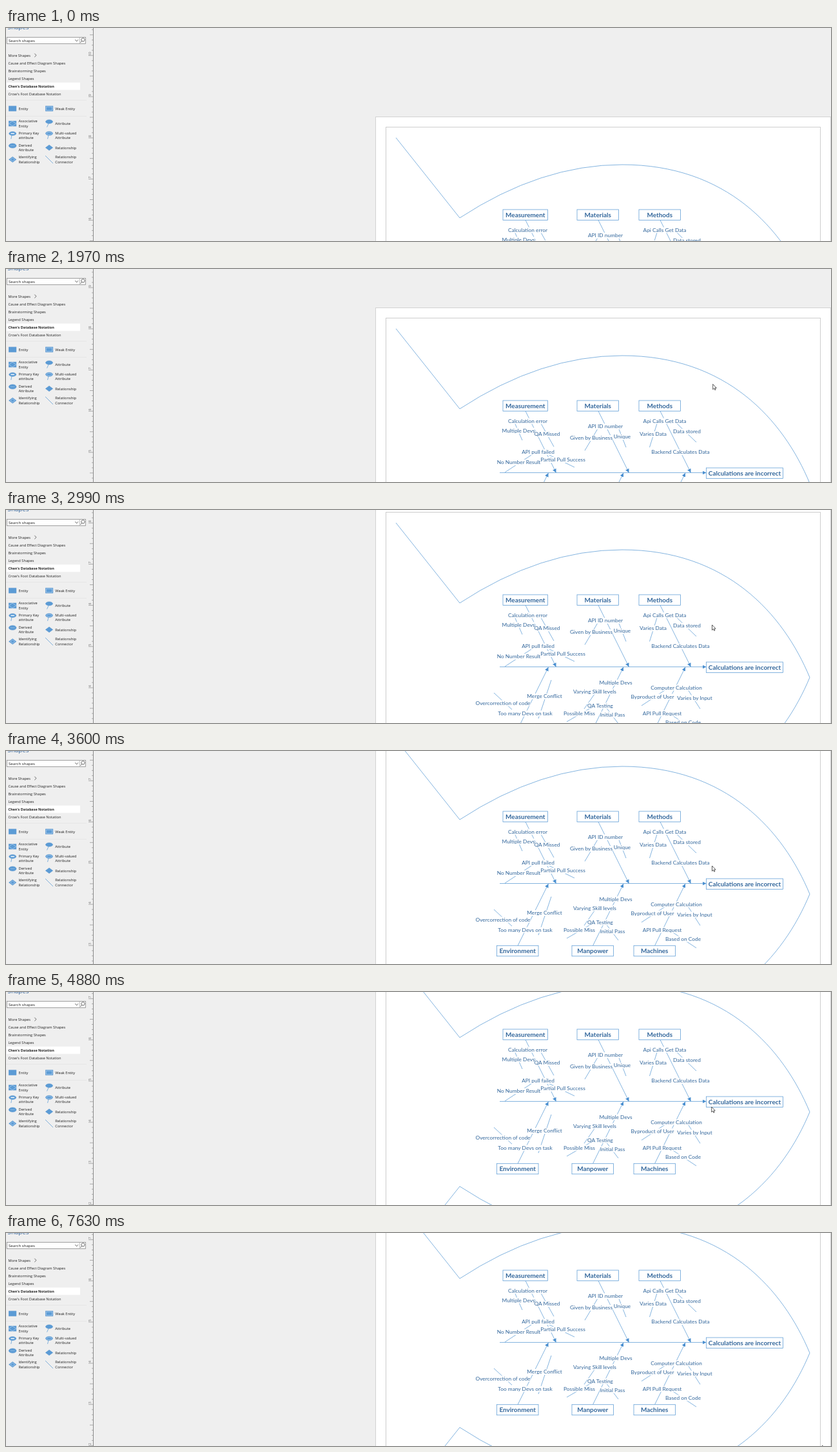
Write an HTML page that moves like this. It is 1280x332 px and loops after 7760 ms.

```html
<!DOCTYPE html>
<html>
<head>
<meta charset="utf-8">
<style>
  html, body { margin: 0; width: 100%; height: 100%; overflow: hidden; background: #efefef; }
  svg { display: block; width: 100vw; height: 100vh; }
  text { font: 5.7px "Open Sans", "Noto Sans", sans-serif; fill: #222; }
  .line { fill: none; stroke: #5b9bd5; stroke-width: .75; }
  .shape { fill: #5b9bd5; stroke: #5592cc; stroke-width: .5; }
  .inner { fill: none; stroke: #b4d2ee; stroke-width: .7; }
  .thin { fill: none; stroke: #444; stroke-width: .8; }
  #labels text { font: 8.35px Lato, Carlito, sans-serif; fill: #33679c; text-anchor: middle; }
  #heads text { font: bold 9.95px Lato, Carlito, sans-serif; fill: #33679c; text-anchor: middle; }
  #ruler text { font-size: 5px; fill: #666; text-anchor: middle; }
</style>
</head>
<body>
<svg viewBox="0 0 1280 332" preserveAspectRatio="none">
  <defs>
    <marker id="arrow" viewBox="0 0 6 6" refX="6" refY="3" markerWidth="6" markerHeight="6"
      markerUnits="userSpaceOnUse" orient="auto"><path d="M0 0L6 3L0 6Z" fill="#4a8fd0"/></marker>
  </defs>
  <rect width="1280" height="332" fill="#efefef"/>

  <g id="drawing">
    <rect x="573.5" y="-86.5" width="706" height="546" fill="#fff" stroke="#d2d2d2"/>
    <rect x="589.5" y="-70.5" width="674" height="515" fill="none" stroke="#cdcdcd"/>
    <path class="line" d="M605 -54L704 71Q830 -12 956 -12C1118 -12 1206 88 1247 187C1206 286 1118 386 956 386Q830 386 704 303L605 428"/>
    <g id="bones" class="line"></g>
    <g id="gaps" fill="#fff"></g>
    <g id="labels"></g>
    <g id="heads"></g>
  </g>
  <g id="ruler"></g>
  <path d="M135.5 0V332" stroke="#8c8c8c"/>

  <g id="panel">
    <text x="2.5" y="2.3" style="font-size:9.8px;fill:#2f639c">Shapes</text>
    <rect x="1.5" y="14.5" width="122" height="10" fill="#fff" stroke="#8a8a8a" stroke-width=".8"/>
    <path class="thin" d="M107.3 18.2L109.7 20.8L112.1 18.2M44.3 39.8L47 42.5L44.3 45.2M117.7 20.2L115.5 23"/>
    <path d="M114.5 14.5V24.5" stroke="#aaa" stroke-width=".8"/>
    <circle class="thin" cx="119.5" cy="18.3" r="2.6"/>
    <rect x="1" y="85" width="114" height="11.5" fill="#fff"/>
    <path d="M0 112.5H125M0 137.5H125" stroke="#e6e6e6"/>

    <rect class="shape" x="4.3" y="121.8" width="11.6" height="7.6"/>
    <rect class="shape" x="61.3" y="121.8" width="11.6" height="7.6"/>
    <rect class="inner" x="62.5" y="123" width="9.2" height="5.2"/>
    <rect class="shape" x="4.3" y="145" width="11.6" height="8"/>
    <path class="inner" d="M4.5 149L10 145.2L15.7 149L10 152.8Z"/>
    <path class="line" d="M66 149L63.5 154.5M9 167L7.8 173M66 167L64.5 173M61 199L73 211"/>
    <ellipse class="shape" cx="67" cy="146" rx="5.5" ry="3"/>
    <ellipse class="shape" cx="10.2" cy="164.5" rx="5.5" ry="3"/>
    <path d="M7.5 164.5H13" stroke="#fff" stroke-width="1.4"/>
    <ellipse class="shape" cx="67" cy="164.3" rx="5.5" ry="3"/>
    <ellipse class="inner" cx="67" cy="164.3" rx="4.2" ry="1.9"/>
    <ellipse class="shape" cx="10.2" cy="183.5" rx="5.8" ry="3.6"/>
    <path class="inner" d="M7.2 183.5H13.2" stroke-dasharray="1.5 .7"/>
    <path class="shape" d="M61.3 186.5L67 182.2L72.7 186.5L67 190.8Z"/>
    <path class="shape" d="M4.5 205L10.2 200.7L15.9 205L10.2 209.3Z"/>
    <path class="inner" d="M6.7 205L10.2 202.4L13.7 205L10.2 207.6Z"/>
  </g>

  <path id="cursor" d="M0 0V8.2L1.9 6.5L3.2 9.2L4.4 8.6L3.2 6H5.6Z" fill="#fff" stroke="#333" stroke-width=".8"/>
</svg>
<script>
const LOOP = 7760, STEP = 70, NOTCH = 32.15, DEPTH = 225;
const $ = id => document.getElementById(id);

function add(parent, tag, attrs, content = '') {
  const el = document.createElementNS('http://www.w3.org/2000/svg', tag);
  for (const key in attrs) el.setAttribute(key, attrs[key]);
  el.textContent = content;
  parent.appendChild(el);
  return el;
}

// Shape panel
const say = (x, mid, content, style = '') => add($('panel'), 'text', { x, y: mid + 2, style }, content);
say(4, 19.6, 'Search shapes', 'font-size:6.1px');
['More Shapes', 'Cause and Effect Diagram Shapes', 'Brainstorming Shapes', 'Legend Shapes',
  "Chen's Database Notation", "Crow's Foot Database Notation"].forEach((name, i) =>
  say(3.4, 42.5 + 12 * i, name, i == 4 ? 'font-weight:bold;font-size:5.5px' : ''));
[['Entity', 'Weak Entity', 126], ['Associative|Entity', 'Attribute', 149],
  ['Primary Key|attribute', 'Multi-valued|Attribute', 167.5], ['Derived|Attribute', 'Relationship', 186.5],
  ['Identifying|Relationship', 'Relationship|Connector', 205]].forEach(([left, right, mid]) =>
  [[19.5, left], [76.3, right]].forEach(([x, name]) => {
    const rows = name.split('|');
    rows.forEach((row, i) => say(x, mid + (i - (rows.length - 1) / 2) * 7.5, row));
  }));

// Ruler: one inch is 64.2 px
for (let n = 11; n >= 0; n--) {
  const y = 171.2 - DEPTH + (8 - n) * 64.2;
  add($('ruler'), 'text', { transform: `translate(132.3 ${y - 2.5}) rotate(-90)` }, n);
  for (let i = 0; i < 8; i++) {
    const x = i == 0 ? 128 : i == 4 ? 130 : 133;
    add($('ruler'), 'path', { d: `M${x} ${y + i * 8.025}H135`, stroke: '#999', 'stroke-width': .8 });
  }
}

// Fishbone
const arrow = d => add($('bones'), 'path', { d, 'marker-end': 'url(#arrow)' });
arrow('M766 170.5H1086.5');
[806, 919, 1015].forEach(x => arrow(`M${x} 74.5L${x + 47.5} 170.5`));
[794, 910.5, 1006.5].forEach(x => arrow(`M${x} 267.5L${x + 47.5} 171`));
add($('bones'), 'path', { d: `M788 90L801 120M829 92L850 130M815 143L774 170M843 143L882 162
  M918 102L898 136M950 100L962 131M1010 94L998.5 131M1040 93L1071 123
  M846 191L826 251M757 211L785 237M913 213L897 236M908 234L870 256M932 235L950 259
  M1022 207L986 231M1058 206L1077 236M1035 247L1071 271` });

`Calculation error,809.5,90;Multiple Devs,795,105;QA Missed,839.5,110.5;API pull failed,825.5,138.5
No Number Result,795.5,154.5;Partial Pull Success,864,150.5;API ID number,930,98.5
Given by Business,908,116.5;Unique,956,114.5;Api Calls Get Data,1022,90;Varies Data,1004,110.5
Data stored,1056.5,106.5;Backend Calculates Data,1046.5,138.5;Merge Conflict,835.5,216.5
Overcorrection of code,771,227;Too many Devs on task,805.5,243;Multiple Devs,946,195
Varying Skill levels,913.5,209;QA Testing,922,231;Possible Miss,889.5,243;Initial Pass,941,245
Computer Calculation,1040,203;Byproduct of User,1003,217;Varies by Input,1068.5,219
API Pull Request,1018,243;Based on Code,1050.5,257`.split(/[;\n]/).forEach(item => {
  const [name, x, mid] = item.split(',');
  const width = add($('labels'), 'text', { x, y: +mid + 2.9 }, name).getComputedTextLength();
  add($('gaps'), 'rect', { x: x - width / 2, y: mid - 4.5, width, height: 9 });
});

[['Measurement', 771, 58, 69.5], ['Materials', 886, 58, 64.5], ['Methods', 982, 58, 64.5],
  ['Environment', 761.5, 267.3, 64.5], ['Manpower', 878, 267.3, 64.5], ['Machines', 974, 267.3, 64.5],
  ['Calculations are incorrect', 1086.5, 163, 119]].forEach(([name, x, y, width]) => {
  add($('heads'), 'rect', { x, y, width, height: 16.5, class: 'line', style: 'fill:#fff' });
  add($('heads'), 'text', { x: x + width / 2, y: y + 11.5 }, name);
});

// Wheel notches: [time, head start of the easing]
const notches = [[1150, 33], [1560, 33], [1970, 33], [2450, 33], [2990, 66], [3530, 33], [4600, 33]];
const held = (t, start) => Math.floor((t - start) / STEP) * STEP;

function scrolled(t) {
  let sum = 0;
  for (const [start, lead] of notches) {
    if (t < start) break;
    const p = Math.min(1, (held(t, start) + lead) / 260);
    sum += NOTCH * (1 - (1 - p) ** 4);
  }
  return Math.round(sum);
}

const mix = (a, b, p) => a.map((v, i) => v + (b[i] - v) * p);
const smooth = p => p * p * (3 - 2 * p);

function pointer(t) {
  if (t < 260) return [1290, 340];
  if (t < 1150) return mix([1258, 324], [1096.7, 179.5], smooth(Math.min(1, (held(t, 260) + 50) / 610)));
  if (t < 2860) return [1096.7, 179.5];
  if (t < 4070) return [1095.5, 179];
  if (t < 5740) return [1094.7, 179];
  if (t < 6570) return mix([1094.7, 179], [1274, 330], smooth(Math.min(1, (held(t, 5740) + 40) / 800)));
  return t < 7630 ? [1290, 340] : [1266.5, 331];
}

function draw(now) {
  const t = now % LOOP, shift = `translate(0 ${DEPTH - scrolled(t)})`;
  $('drawing').setAttribute('transform', shift);
  $('ruler').setAttribute('transform', shift);
  $('cursor').setAttribute('transform', `translate(${pointer(t)})`);
  requestAnimationFrame(draw);
}
draw(0);
</script>
</body>
</html>
```
